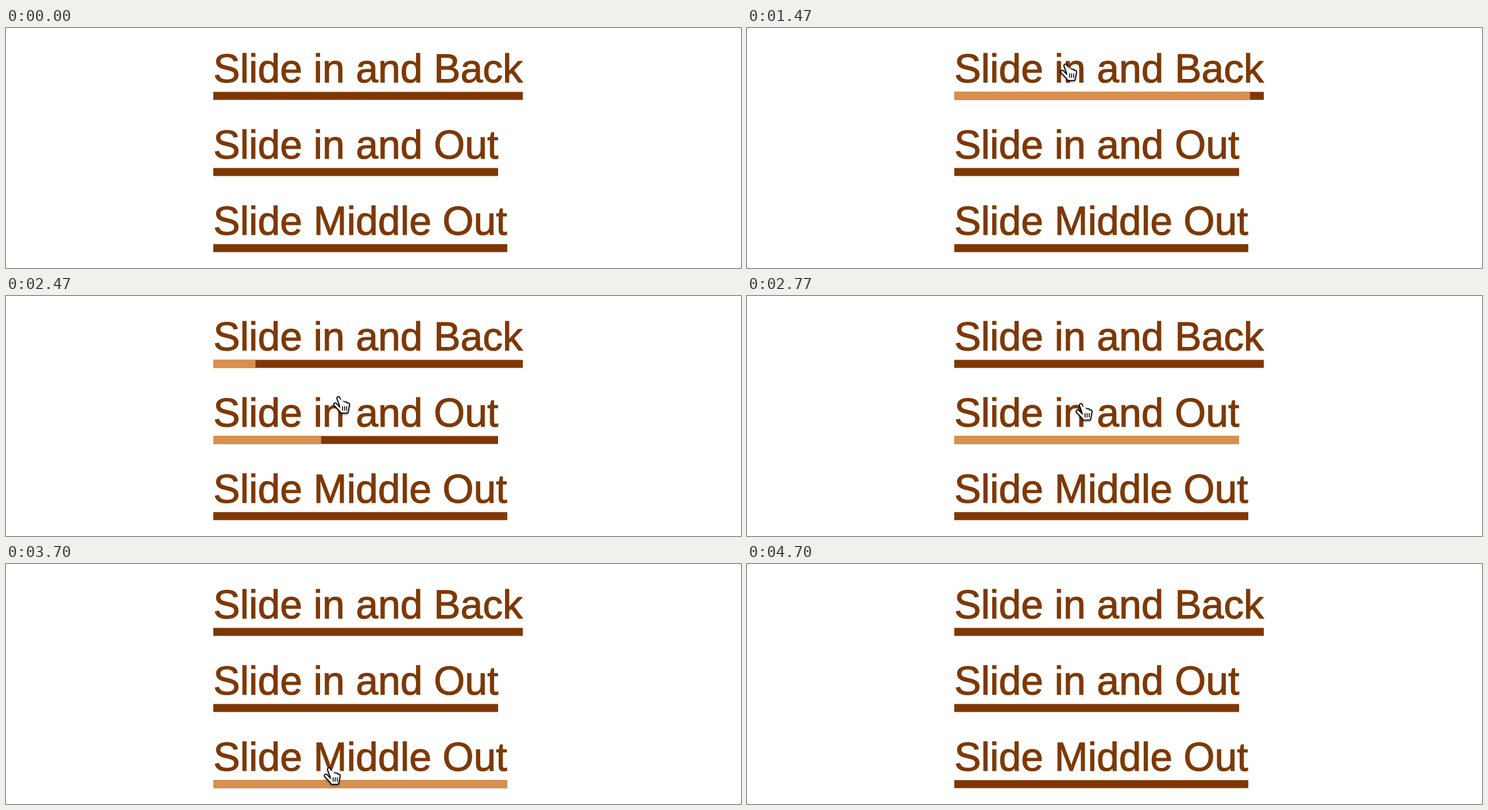
Recreate the animation shown at these times as an HTML page. Size 1280 px wide and 419 px high, loop 4.73 s.

```html
<!DOCTYPE html>
<html lang="en">
<head>
<meta charset="utf-8">
<title>Underline effects</title>
<style>
html, body { margin: 0; height: 100%; overflow: hidden; background: #fff; }
svg { display: block; width: 100vw; height: 100vh; }
text { font: 69.75px "Liberation Sans", Arial, sans-serif; fill: #7d3905; stroke: #7d3905; stroke-width: 1.2; }
.bar { fill: #7f3804; }
.glow { fill: #d7904d; }
#hand { fill: #fff; stroke: #000; stroke-linecap: round; stroke-linejoin: round; filter: drop-shadow(0 2px 1.5px rgba(0, 0, 0, .4)); }
</style>
</head>
<body>
<svg viewBox="0 0 1280 419">
  <g id="rows"></g>
  <g id="hand">
    <path id="shape" stroke-width="7" d="M1.5 3.5L6 16L7 27H16L18.3 14.5M10 11.5V20M14.5 12.5V20M-4 14.5L6 25"/>
    <path id="skin" stroke="#fff" stroke-width="3.4"/>
    <path stroke-width="1.6" d="M8.7 18V24.5M12.3 18V24.5M15.9 18V24.5"/>
  </g>
</svg>
<script>
const LOOP = 4730, LEFT = 361, PITCH = 132.9, SLIDE = 300;

// span(a, b) gives the lit part of a bar from progress in (a) and out (b)
const rows = [
  { label: 'Slide in and Back', enter: 1250, leave: 2300, span: (a, b) => [0, a - b] },
  { label: 'Slide in and Out', enter: 2400, leave: 3065, span: (a, b) => [b, a] },
  { label: 'Slide Middle Out', enter: 3164, leave: 3740,
    span: (a, b) => [.5 - (a - b) / 2, .5 + (a - b) / 2] },
];

// the fingertip starts above the stage and rests once on each row
const home = { x: 548, y: -40 };
const moves = [
  { at: 1150, time: 200, x: 553, y: 62 },
  { at: 2200, time: 300, x: 580, y: 187 },
  { at: 3000, time: 230, x: 561, y: 355 },
  { at: 3740, time: 60, x: 562, y: 440 },
];

const $ = id => document.getElementById(id);

function add(tag, attrs) {
  const el = document.createElementNS('http://www.w3.org/2000/svg', tag);
  for (const key in attrs) el.setAttribute(key, attrs[key]);
  return $('rows').appendChild(el);
}

$('skin').setAttribute('d', $('shape').getAttribute('d'));

rows.forEach((row, i) => {
  const text = add('text', { x: LEFT, y: 95 + PITCH * i });
  text.textContent = row.label;
  row.width = Math.round(text.getComputedTextLength());
  const box = { x: LEFT, y: 111.5 + PITCH * i, width: row.width, height: 14 };
  add('rect', { ...box, class: 'bar' });
  row.glow = add('rect', { ...box, class: 'glow' });
});

const clamp = v => Math.min(1, Math.max(0, v));

// cubic-bezier(.25, .1, .25, 1)
function ease(x) {
  if (x <= 0 || x >= 1) return clamp(x);
  const curve = (s, p, q) => 3 * s * (1 - s) ** 2 * p + 3 * s * s * (1 - s) * q + s ** 3;
  let lo = 0, hi = 1;
  for (let i = 0; i < 24; i++) {
    const mid = (lo + hi) / 2;
    if (curve(mid, .25, .25) < x) lo = mid; else hi = mid;
  }
  return curve(lo, .1, 1);
}

function tip(t) {
  let { x, y } = home;
  for (const move of moves) {
    const k = clamp((t - move.at) / move.time);
    x += (move.x - x) * k;
    y += (move.y - y) * k;
  }
  return [x, y];
}

function draw(t) {
  for (const { glow, width, enter, leave, span } of rows) {
    const [from, to] = span(ease((t - enter) / SLIDE), ease((t - leave) / SLIDE));
    glow.setAttribute('x', LEFT + width * from);
    glow.setAttribute('width', width * (to - from));
  }
  $('hand').setAttribute('transform', `translate(${tip(t)})`);
}

const start = performance.now();
function frame() {
  draw((performance.now() - start) % LOOP);
  requestAnimationFrame(frame);
}
frame();
</script>
</body>
</html>
```
